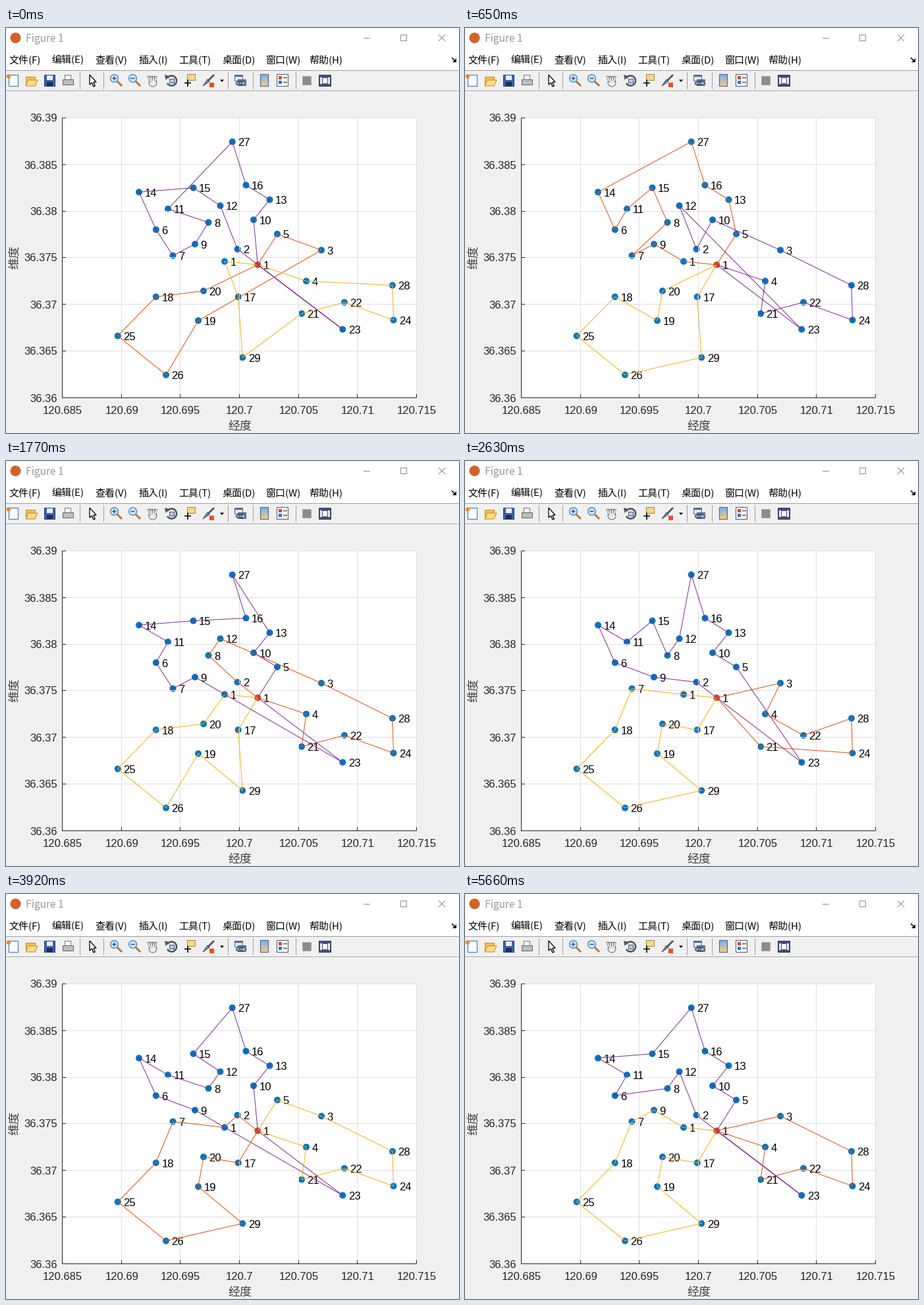
A matplotlib script for the animation above (7.11 s loop, 688 by 615 pixels).

```python
import random

import numpy as np
import matplotlib.pyplot as plt
from matplotlib.animation import FuncAnimation
from matplotlib.patches import Arc, Circle, Ellipse, Polygon, Rectangle

W, H, DPI = 688, 615, 100
LOOP, TICK = 7110, 30
PT = 72 / DPI
SANS, CJK = "Liberation Sans", "Noto Sans CJK JP"
ORANGE, YELLOW, PURPLE = "#D95319", "#EDB120", "#7E2F8E"
BLUE, INK, PANEL, EDGE = "#0072BD", "#262626", "#F0F0F0", "#54688C"

# Stop 0 is the depot.
STOPS = np.array([
    (382.3, 359.5), (332, 354.5), (351.5, 335.8), (479, 337.3), (456, 384.2),
    (412, 312.8), (227.8, 306.2), (253.5, 345.6), (307.5, 295.2), (287, 328.2),
    (376, 291.2), (246, 274.7), (325.5, 269.8), (400.5, 260.7), (202, 249.2),
    (284.5, 242.6), (364.5, 238.6), (352.7, 408.2), (227.7, 408.2),
    (292, 444.3), (300, 399.2), (449, 433.7), (514, 416.6), (511.3, 457.6),
    (588.5, 443.5), (169.7, 467.5), (243, 526.7), (343.7, 172.7),
    (587, 390.7), (359.2, 500.3),
])

plt.rcParams["path.snap"] = False
fig = plt.figure(figsize=(W / DPI, H / DPI), dpi=DPI, facecolor=PANEL)


def stage():
    ax = fig.add_axes([0, 0, 1, 1])
    ax.set(xlim=(0, W), ylim=(H, 0))
    ax.axis("off")
    return ax


ax = stage()


def shape(patch, fc="none", ec="none", lw=1.0):
    patch.set(facecolor=fc, edgecolor=ec, linewidth=lw * PT)
    ax.add_patch(patch)


def rect(x, y, w, h, *style):
    shape(Rectangle((x, y), w, h), *style)


def disc(x, y, r, *style):
    shape(Circle((x, y), r), *style)


def poly(pts, *style):
    shape(Polygon(pts, closed=True), *style)


def line(pts, color, lw=1.0):
    ax.plot(*zip(*pts), color=color, lw=lw * PT, solid_capstyle="butt")


def hline(x0, x1, y, color, lw=1.0):
    line([(x0, y), (x1, y)], color, lw)


def vline(x, y0, y1, color, lw=1.0):
    line([(x, y0), (x, y1)], color, lw)


def text(x, y, s, px=16.67, color=INK, font=SANS, ha="left", **kw):
    kw.setdefault("va", "baseline")
    ax.text(x, y, s, fontsize=px * PT, color=color, family=font, ha=ha, **kw)


def draw_window():
    rect(0, 0, W, 64, "white")
    disc(14.5, 15, 8, "#D2622A")
    text(30, 21, "Figure 1", 15.6, "#999999", CJK)
    hline(543, 553, 15.5, "#8C8C8C")
    rect(599.5, 10.5, 9, 9, "none", "#8C8C8C")
    line([(657, 10), (667, 20)], "#8C8C8C")
    line([(657, 20), (667, 10)], "#8C8C8C")

    x = 4
    for s in ("文件(F)", "编辑(E)", "查看(V)", "插入(I)",
              "工具(T)", "桌面(D)", "窗口(W)", "帮助(H)"):
        text(x, 53, s, 15, "black", CJK)
        x += 61 if "I" in s else 65.8
    line([(677, 45), (682, 50)], "black", 1.5)
    poly([(684, 46), (684, 52), (678, 52)], "black")

    for y, c in ((64.5, "#A0A0A0"), (95.5, "#A0A0A0"), (96.5, "white")):
        hline(0, W, y, c)
    for x in (112.5, 148.5, 337.5, 375.5, 440.5):
        vline(x, 67, 93, "#A0A0A0")


def lens(x, zoom_in):
    line([(x + 2, 81), (x + 9, 88)], "#B9773A", 3)
    disc(x - 2.5, 76.5, 5.8, "#D5E8F8", "#5B93CC", 1.6)
    hline(x - 5.5, x + .5, 76.5, "#1F4E8C", 1.5)
    if zoom_in:
        vline(x - 2.5, 73.5, 79.5, "#1F4E8C", 1.5)


def draw_icons():
    # new, open, save, print
    rect(4.5, 71.5, 14, 17, "white", "#4E86BE", 1.3)
    disc(4, 73.5, 3.2, "#E98A2B")
    rect(30.5, 74.5, 14, 13, "#F1C152", "#C58A25")
    poly([(30, 88), (34, 79), (48, 79), (44, 88)], "#FBDD83", "#C58A25")
    rect(58.5, 71.5, 16, 17, "#3E62A6", "#24427E")
    rect(62, 72, 9, 7, "#E9F0FA")
    rect(62, 82, 9, 6, "#1B2F5C")
    rect(89.5, 71.5, 9, 8, "white", "#777777")
    rect(86.5, 78.5, 16, 8, "#BDBDBD", "#666666")

    # pointer, zoom, pan, rotate
    poly([(127, 71), (127, 86), (130.5, 83), (133, 89), (135.3, 88),
          (132.8, 82.3), (137, 82)], "white", "black", 1.3)
    lens(167, True)
    lens(195, False)
    for i in range(4):
        line([(220 + 2 * i, 82), (216 + 4 * i, 73)], EDGE, 3.6)
    shape(Ellipse((223, 83), 12, 12), "#FBEBD8", EDGE)
    for i in range(4):
        line([(220 + 2 * i, 82), (216.2 + 4 * i, 74)], "#FBEBD8", 2)
    shape(Arc((251.5, 80), 15, 15, theta1=-150, theta2=150), "none", "#4B5565", 2.6)
    poly([(241, 71), (248, 73), (242.5, 79)], "#4B5565")
    rect(248.5, 77.5, 7, 6, "#B8C9DF", "#4B5565")

    # data tip, brush
    rect(275.5, 70.5, 12, 9, "#F6D88A", "#A8843A")
    hline(271, 281, 83.5, "black", 1.6)
    vline(276, 78.5, 89, "black", 1.6)
    line([(316, 71), (307, 80)], "#4C566B", 2.8)
    poly([(306, 78), (309, 81), (299, 88)], "#7E8BA6", "#46506A")
    rect(309, 83, 7, 7, "#E0532C")
    poly([(325, 78.5), (331, 78.5), (328, 82)], "black")

    # link, colour bar, legend, hide, dock
    for x, y in ((347.5, 71.5), (352.5, 78.5)):
        rect(x, y, 12, 9, "#DCE6F2", EDGE)
        hline(x, x + 12, y + 1.5, EDGE, 2)
    for x in (354, 359):
        shape(Ellipse((x, 84), 9, 5), "none", "#3E4F70", 1.6)
    ramp = np.linspace((.5, .7, .92), (.96, .8, .45), 6)
    for i, c in enumerate(ramp):
        rect(387, 71 + 3 * i, 11, 3, c)
    rect(386.5, 70.5, 12, 18, "none", EDGE, 1.2)
    rect(411.5, 70.5, 17, 18, "white", EDGE, 1.2)
    for y, c in ((73, "#D9472B"), (80, "#3C74C4")):
        rect(414, y, 5, 5, c)
        hline(421, 427, y + 2.5, "#777777", 2)
    rect(450.5, 73.5, 13, 13, "#8C8C8C", "#A8A8A8")
    rect(475.5, 71.5, 18, 17, "#46507A", "#2E3656")
    rect(477, 75, 15, 10, "#E8EDF6")
    rect(480.5, 75.5, 8, 9, "white", "#46507A")


def draw_chart():
    left, right, top, bottom = 85.5, 623.5, 136.5, 561.5
    rect(left, top, right - left, bottom - top, "white")
    xs = np.round(np.linspace(left, right, 7) - .5) + .5
    ys = np.round(np.linspace(bottom, top, 7) - .5) + .5
    for i, (x, y) in enumerate(zip(xs, ys)):
        vline(x, top, bottom, "#DFDFDF")
        hline(left, right, y, "#DFDFDF")
        text(x + .5, 586, f"{120.685 + .005 * i:.6g}", ha="center")
        text(78, y + 6, f"{36.36 + .005 * i:.5g}", ha="right")
    for x, y in zip(xs, ys):
        vline(x, bottom, bottom - 5.5, INK)
        hline(left, left + 5.5, y, INK)
    line([(left, top), (left, bottom), (right, bottom)], INK)
    label = dict(px=18, color="#404040", font=CJK, ha="center", va="center")
    text(355, 605, "经度", **label)
    text(12.7, 348, "维度", rotation=90, **label)

    for i, (x, y) in enumerate(STOPS):
        disc(x, y, 5, BLUE if i else "#D2492B")
        text(x + 8.6, y + 6.4, str(i or 1), color="black")


draw_window()
draw_icons()
draw_chart()

# Flatten the fixed parts once, so only the routes are redrawn.
fig.canvas.draw()
backdrop = np.array(fig.canvas.buffer_rgba())
fig.clear()
fig.figimage(backdrop, origin="upper", zorder=-1)
ax = stage()
routes = [ax.plot([], [], color=c, lw=PT)[0] for c in (ORANGE, YELLOW, PURPLE)]

rng = random.Random(4)
timeline = []


def path(tour):
    return STOPS[[0, *tour, 0]]


def length(tour):
    return np.hypot(*np.diff(path(tour), axis=0).T).sum()


def improve(tour):
    """One 2-opt step: the best of some random reversals, if any is shorter."""
    options = [tour]
    for _ in range(12):
        i, j = sorted(rng.sample(range(len(tour) + 1), 2))
        options.append(tour[:i] + tour[i:j][::-1] + tour[j:])
    return min(options, key=length)


def show(start, orange, yellow, purple, later=()):
    """Show a plan; later the outer vehicles trade tours and the search goes on."""
    timeline.append((start, (orange, yellow, purple)))
    plan = purple, yellow, orange
    for ms in later:
        plan = [improve(t) for t in plan]
        timeline.append((ms, plan))


# Runs of stops that survive through most of the search.
south = [17, 20, 19, 29, 26, 25, 18, 7]
east = [4, 21, 22, 24, 28, 3]
peak = [10, 13, 16, 27]
ridge = [5] + peak

show(0, [5, 3, 19, 26, 25, 18, 20],
     [1, 17, 29, 21, 22, 24, 28, 4],
     peak + [11, 8, 9, 7, 6, 14, 15, 12, 2, 23],
     later=np.linspace(110, 440, 4))
show(650, [5, 13, 16, 27, 14, 6, 11, 15, 8, 7, 9, 1],
     [17, 29, 26, 25, 18, 19, 20],
     east + [10, 2, 12, 23],
     later=[780, 850, *np.linspace(1380, 1640, 3)])
show(1770, east + [12, 8, 2],
     [17, 29, 19, 26, 25, 18, 20, 1],
     [5, 10, 13, 27, 16, 15, 14, 11, 6, 7, 9, 23],
     later=[2100])
show(2630, [3, 4, 22, 28, 24, 21], south + [1],
     [23] + ridge + [12, 8, 15, 11, 14, 6, 9, 2],
     later=[*np.linspace(2830, 3030, 3), 3180])
show(3250, ridge + [12, 8, 15, 14, 11, 6, 9, 2], east, south + [1, 23],
     later=[3580, 3650])
show(3920, south + [1, 2], east + [5], peak + [15, 12, 8, 11, 14, 6, 9, 23],
     later=[4050, 4380, 4580, 4850])
show(5660, east, south + [9, 1], ridge + [15, 14, 11, 6, 8, 12, 2, 23])


def update(n):
    now = (n + 1) * TICK
    plan = [p for ms, p in timeline if ms < now][-1]
    for route, tour in zip(routes, plan):
        route.set_data(*path(tour).T)
    return routes


anim = FuncAnimation(fig, update, frames=LOOP // TICK, interval=TICK,
                     repeat=True, repeat_delay=0)
plt.show()
```
